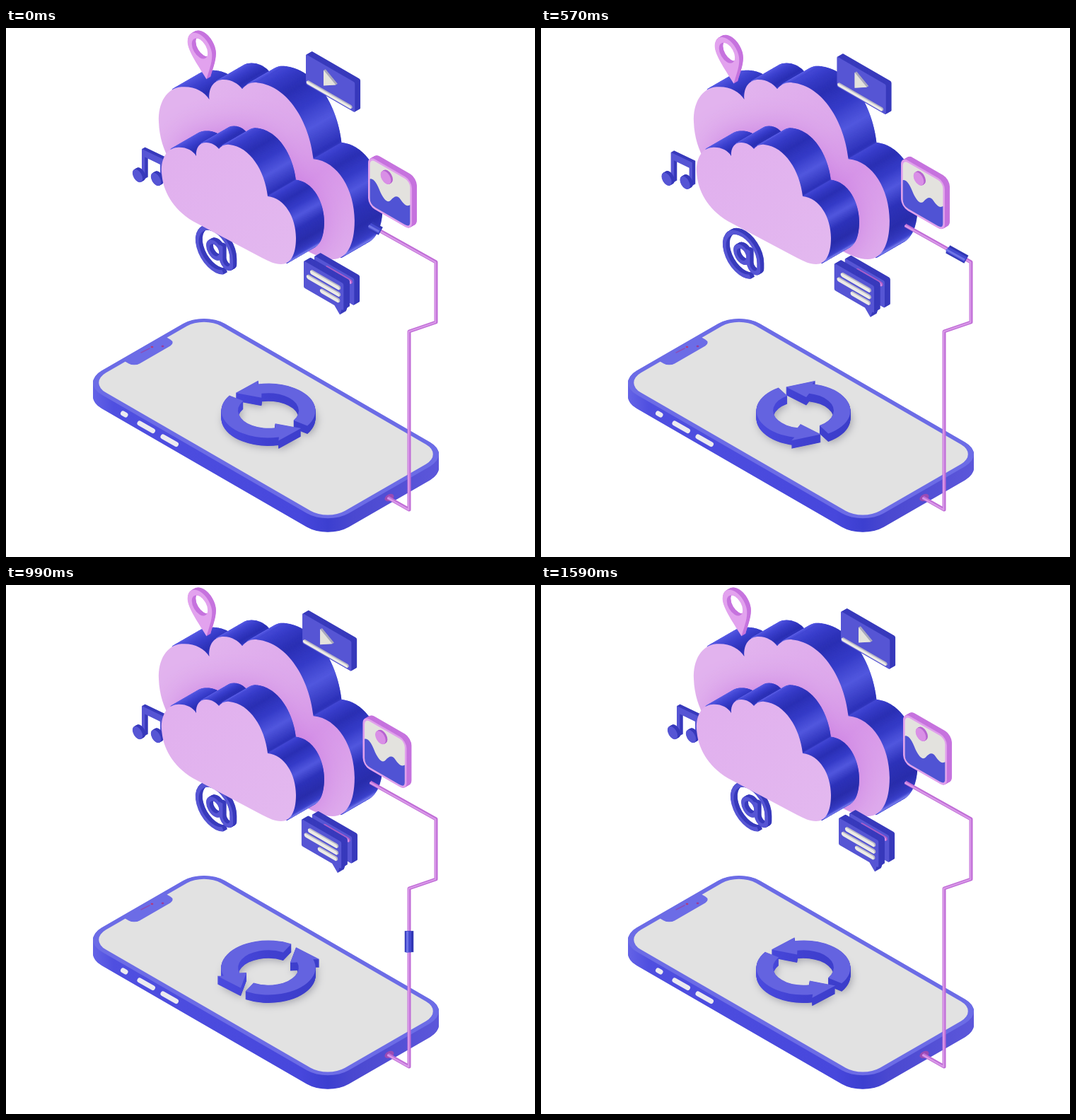
Recreate the animation shown at these times as an HTML page with a canvas. Size 748 by 748 pixels, loop 1.62 s.

```html
<!DOCTYPE html>
<html lang="en">
<head>
<meta charset="utf-8">
<title>Cloud sync</title>
<style>
html, body { margin: 0; height: 100%; overflow: hidden; background: #fff; }
canvas { display: block; width: 100vw; height: 100vh; }
</style>
</head>
<body>
<canvas id="stage" width="748" height="748"></canvas>
<script>
const SIZE = 748, LOOP = 1620, STEP = 30;
const CX = 0.866, SY = 0.5;
const stage = document.getElementById('stage').getContext('2d');
const sheet = document.createElement('canvas');
sheet.width = sheet.height = SIZE;
let ctx = stage;

const rect = (x, y, w, h, r) => { const p = new Path2D(); p.roundRect(x, y, w, h, r); return p; };
const circle = (x, y, r) => { const p = new Path2D(); p.arc(x, y, r, 0, 7); return p; };
const flat = () => ctx.setTransform(1, 0, 0, 1, 0, 0);

function ramp(x0, y0, x1, y1, ...stops) {
  const g = ctx.createLinearGradient(x0, y0, x1, y1);
  stops.forEach(([at, color]) => g.addColorStop(at, color));
  return g;
}

// Smooth curve through [time, value] rows
function track(rows, t) {
  const sec = i => (rows[i + 1][1] - rows[i][1]) / (rows[i + 1][0] - rows[i][0]);
  const slope = i => {
    if (i === 0 || i === rows.length - 1) return 0;
    const a = sec(i - 1), b = sec(i);
    return a * b > 0 ? 2 * a * b / (a + b) : 0;
  };
  const last = rows.length - 1;
  if (t >= rows[last][0]) return rows[last][1];
  const i = rows.findIndex((r, n) => n < last && t < rows[n + 1][0]);
  const h = rows[i + 1][0] - rows[i][0], u = (t - rows[i][0]) / h, v = 1 - u;
  return rows[i][1] * v * v * (1 + 2 * u) + rows[i + 1][1] * u * u * (3 - 2 * u)
    + h * u * v * (slope(i) * v - slope(i + 1) * u);
}

// Extrudes a path that lies in the upright plane
function wall(path, x, y, depth, face, side, width) {
  for (let k = depth; k >= 0; k -= 0.5) {
    ctx.setTransform(CX, SY, 0, 1, x + CX * k, y - SY * k);
    const color = k > 0 ? side : face;
    if (width) {
      ctx.lineWidth = width;
      ctx.strokeStyle = color;
      ctx.stroke(path);
    } else {
      ctx.fillStyle = color;
      ctx.fill(path, 'evenodd');
    }
  }
  flat();
}

function bar(x, y, x0, x1, ly, w, face = '#ecebe6', side = '#b9b8c6') {
  ctx.lineCap = 'round';
  wall(new Path2D(`M${x0} ${ly}H${x1}`), x - 1, y + 0.5, 2, face, side, w);
  ctx.lineCap = 'butt';
}

/* Clouds */
const CLOUD = 'M220 203C219 184 228 170 242 169C254 168 264 173 269 181C268 169 274 162 283 162' +
  'C291 162 297 166 301 171C305 166 311 164 316 165C345 168 366 202 370 238' +
  'C394 240 410 268 410 297C410 321 402 334 389 334C380 334 372 330 362 325L264 273C236 256 221 230 220 203Z';

// Side colour by direction of the surface, in degrees above the right
const SHADE = [
  [-60, 70, 76, 212], [-42, 125, 130, 238], [-28, 62, 68, 206], [-5, 42, 46, 172], [8, 46, 51, 186],
  [20, 82, 88, 222], [32, 54, 60, 200], [48, 43, 48, 180], [72, 58, 63, 204], [100, 82, 86, 224], [121, 104, 106, 234]
];
function shade(deg) {
  let i = 0;
  while (i < SHADE.length - 2 && deg > SHADE[i + 1][0]) i++;
  const a = SHADE[i], b = SHADE[i + 1];
  const u = Math.max(0, Math.min(1, (deg - a[0]) / (b[0] - a[0])));
  return `rgb(${[1, 2, 3].map(n => Math.round(a[n] + (b[n] - a[n]) * u))})`;
}

function cloud(kx, ky, dx, dy, fill) {
  const line = document.createElementNS('http://www.w3.org/2000/svg', 'path');
  line.setAttribute('d', CLOUD);
  const len = line.getTotalLength(), n = Math.round(len / 1.5), pts = [];
  for (let i = 0; i <= n; i++) {
    const p = line.getPointAtLength(len * i / n);
    pts.push([p.x * kx + dx, p.y * ky + dy]);
  }
  const edges = [];
  for (let i = 0; i < n; i++) {
    const [a, b] = [pts[i], pts[i + 1]];
    const nx = b[1] - a[1], ny = a[0] - b[0];
    if (nx * CX - ny * SY > 0) edges.push([a, b, shade(Math.atan2(-ny, nx) * 180 / Math.PI)]);
  }
  ctx.lineWidth = 1.8;
  ctx.lineCap = 'round';
  for (let k = 45; k >= 0; k -= 0.9) {
    for (const [a, b, color] of edges) {
      ctx.strokeStyle = color;
      ctx.beginPath();
      ctx.moveTo(a[0] + CX * k, a[1] - SY * k);
      ctx.lineTo(b[0] + CX * k, b[1] - SY * k);
      ctx.stroke();
    }
  }
  ctx.lineCap = 'butt';
  const face = new Path2D();
  face.addPath(new Path2D(CLOUD), new DOMMatrix([kx, 0, 0, ky, dx, dy]));
  ctx.fillStyle = fill;
  ctx.fill(face);
  return face;
}

function clouds() {
  const back = cloud(1.457, 1.477, -104.5, -166.3, ramp(290, 80, 480, 310,
    [0, '#e2b3ee'], [0.4, '#dda8eb'], [0.65, '#d796e8'], [1, '#deaaec']));
  ctx.save();
  ctx.clip(back);
  ctx.translate(28, -16);
  ctx.shadowColor = 'rgba(178,78,214,.6)';
  ctx.shadowBlur = 50;
  ctx.fill(new Path2D(CLOUD));
  ctx.restore();
  cloud(1, 1, 0, 0, ramp(240, 170, 400, 330, [0, '#e1b0ee'], [1, '#e3b8ef']));
}

/* Phone */
function onTop(path) {
  const p = new Path2D();
  p.addPath(path, new DOMMatrix([CX, SY, -CX, SY, 280, 401]));
  return p;
}

function phone() {
  const L = 403.3, W = 201.2;
  const body = onTop(rect(0, 0, L, W, 34));
  ctx.fillStyle = ramp(123, 0, 612, 0, [0, '#6463e6'], [0.06, '#4f4fe0'], [0.6, '#4747dc'],
    [0.68, '#3c3fd0'], [0.75, '#4a48d0'], [1, '#5c57da']);
  for (let k = 19.5; k > 0; k -= 0.5) {
    ctx.setTransform(1, 0, 0, 1, 0, k);
    ctx.fill(body);
  }
  flat();
  ctx.fillStyle = '#6c6ce6';
  ctx.fill(body);
  ctx.fillStyle = '#e2e2e2';
  ctx.fill(onTop(rect(6.5, 6.5, L - 13, W - 13, 28)));
  ctx.fillStyle = '#6c6ce6';
  ctx.fill(onTop(rect(5, 67, 16, 68, [0, 9, 9, 0])));
  ctx.lineCap = 'round';
  const dash = (x0, y0, x1, y1, w, color) => {
    ctx.lineWidth = w;
    ctx.strokeStyle = color;
    ctx.beginPath();
    ctx.moveTo(x0, y0);
    ctx.lineTo(x1, y1);
    ctx.stroke();
  };
  dash(191, 459, 203, 453, 1.6, '#8a4fb8');
  dash(206, 451, 207, 451, 2.6, '#b03c80');
  dash(221, 450, 222, 450, 2.6, '#9a3c98');
  dash(165.5, 545, 169, 547, 7, '#ecebf0');
  dash(189, 559, 207.5, 569.5, 7, '#ecebf0');
  dash(222, 578, 240.5, 588.5, 7, '#ecebf0');
  ctx.lineCap = 'butt';
  ctx.fillStyle = '#9a4bb4';
  ctx.beginPath();
  ctx.ellipse(542, 664, 7, 4.5, -0.5, 0, 7);
  ctx.fill();
}

/* Cable and the plug that runs along it */
const CABLE = [[515, 279], [608, 331], [608, 416], [570, 429], [570, 681], [540, 664]];
const PLUG = [[0, 2], [240, 3], [570, 84], [840, 221], [1140, 390], [1380, 497], [1500, 540]];

function piece(from, to) {
  const p = new Path2D();
  let s = 0, open = false;
  for (let i = 0; i < CABLE.length - 1; i++) {
    const [a, b] = [CABLE[i], CABLE[i + 1]];
    const len = Math.hypot(b[0] - a[0], b[1] - a[1]);
    const u = Math.max(0, (from - s) / len), v = Math.min(1, (to - s) / len);
    if (u < v) {
      const at = q => [a[0] + (b[0] - a[0]) * q, a[1] + (b[1] - a[1]) * q];
      if (!open) p.moveTo(...at(u));
      p.lineTo(...at(v));
      open = true;
    }
    s += len;
  }
  return p;
}

function pipe(path, layers) {
  ctx.lineJoin = 'round';
  for (const [w, color, shift] of layers) {
    ctx.setTransform(1, 0, 0, 1, shift, -shift / 4);
    ctx.lineWidth = w;
    ctx.strokeStyle = color;
    ctx.stroke(path);
  }
  flat();
  ctx.lineJoin = 'miter';
}

function cable(t) {
  pipe(piece(0, 999), [[5, '#bf6bd6', 0], [2.2, '#d999e8', -0.7]]);
  const s = track(PLUG, t);
  pipe(piece(s - 15, s + 15), [[12.5, '#3036b4', 0], [8, '#444ad0', -1], [3, '#6f74e6', -2.4]]);
}

/* Sync arrows */
const SPIN = [[0, 0], [240, 63], [570, 156], [840, 242], [1140, 303], [1380, 345], [1590, 358.5], [1620, 360]];

function arrow(path, base) {
  const rad = d => -d * Math.PI / 180;
  const to = (r, d) => path.lineTo(r * Math.cos(rad(d)), r * Math.sin(rad(d)));
  const tail = base - 137;
  path.moveTo(Math.cos(rad(tail)), Math.sin(rad(tail)));
  path.arc(0, 0, 1, rad(tail), rad(base), true);
  to(1.13, base - 2);
  to(0.95, base + 34);
  to(0.5, base + 4);
  path.arc(0, 0, 0.645, rad(base), rad(tail), false);
  path.closePath();
}

function spinner(t) {
  const turn = 103 + track(SPIN, t), p = new Path2D(), depth = 11.5;
  arrow(p, turn);
  arrow(p, turn + 180);
  const side = ramp(-1, 0, 1, 0, [0, '#4a4ade'], [0.5, '#4040d0'], [1, '#3b3dca']);
  for (let k = depth; k >= 0; k -= 0.5) {
    ctx.setTransform(66.5, 0, 0, 38.4, 371, 541 + k);
    ctx.shadowColor = k === depth ? 'rgba(80,80,100,.45)' : 'transparent';
    ctx.shadowBlur = 12;
    ctx.shadowOffsetX = 2;
    ctx.shadowOffsetY = 2;
    ctx.fillStyle = k > 0 ? side : '#6463e0';
    ctx.fill(p);
  }
  flat();
}

/* Floating icons */
const BLUE = '#5655d4', NAVY = '#383abc', PINK = '#e2a2ee', PLUM = '#c673de';

const pinShape = new Path2D('M-20 0A20 20 0 0 1 20 0C20 12 14 26 11 38C0 27 -20 14 -20 0Z');
pinShape.addPath(circle(0, 0, 13));
const atShape = new Path2D('M11 -12V7A8.5 8.5 0 0 0 28 7V0A28 28 0 1 0 14 24.3');
atShape.addPath(circle(0, 0, 10.5));
const notes = new Path2D('M0 0L35 -3V30H30V7L5 9V40H0Z');
const bubble = new Path2D('M2 0H63Q65 0 65 2V36Q65 38 63 38H62L59 47L50 38H2Q0 38 0 36V2Q0 0 2 0Z');
const hills = new Path2D('M3 32C9 27 15 33 20 42C26 50 32 52 37 45C43 36 48 32 53 36C59 40 62 42 68.5 36V60Q68.5 68 60 68H12Q3 68 3 59Z');
const play = new Path2D('M30 7L50 18L30 29Z');

function pin(x, y) { wall(pinShape, x + 274, y + 29, 6.5, PINK, PLUM); }

function at(x, y) { wall(atShape, x + 294.5, y + 314, 6, BLUE, NAVY, 5.5); }

function music(x, y) {
  x += 192;
  y += 171;
  wall(notes, x, y, 5, BLUE, NAVY);
  for (const [hx, hy] of [[-7, 41.5], [23, 31.5]]) wall(circle(hx, hy, 8.2), x, y, 5, BLUE, NAVY);
}

function video(x, y) {
  x += 424;
  y += 37;
  wall(rect(0, 0, 80, 42.5, 2), x, y, 9, BLUE, NAVY);
  wall(play, x - 1, y + 0.5, 3, '#e4e3dc', '#a9a8bd');
  bar(x, y, 4, 73, 38, 4);
}

function picture(x, y) {
  x += 512;
  y += 180;
  wall(rect(0, 0, 71.6, 71, 11), x, y, 8, '#e09fec', PLUM);
  wall(rect(3, 3, 65.6, 65, 8), x, y, 0, '#e3e2de');
  wall(hills, x, y, 0, '#5053d4');
  wall(circle(30, 16, 8.5), x - 1, y + 0.5, 3, '#d98fe6', '#b765d0');
}

function chat(x, y) {
  wall(rect(0, 0, 65, 38, 2), x + 436, y + 322, 9, BLUE, NAVY);
  bar(x + 436, y + 322, 21, 59, 7, 5, '#d98ee8', '#a95ac8');
  wall(bubble, x + 421, y + 329, 10, BLUE, NAVY);
  bar(x + 421, y + 329, 14, 57, 9.5, 5);
  bar(x + 421, y + 329, 8, 57, 19, 5);
  bar(x + 421, y + 329, 30, 56, 28, 5);
}

// One drift down-left and back: start, duration, distance
function drift(draw, t, start, span, reach) {
  const u = (t - start) / span;
  const d = u > 0 && u < 1 ? reach * Math.sin(Math.PI * u) ** 2 : 0;
  draw(-d, d * 0.57);
}

function paintSheet() {
  ctx = sheet.getContext('2d');
  clouds();
  phone();
  ctx = stage;
}

function frame() {
  const t = Math.floor(performance.now() % LOOP / STEP) * STEP;
  flat();
  ctx.fillStyle = '#fff';
  ctx.fillRect(0, 0, SIZE, SIZE);
  drift(music, t, 160, 765, 8.5);
  drift(at, t, 195, 730, 11);
  ctx.drawImage(sheet, 0, 0);
  cable(t);
  drift(pin, t, 195, 750, 11);
  drift(video, t, 310, 920, 9.2);
  drift(picture, t, 428, 814, 11);
  drift(chat, t, 210, 1000, 7.7);
  spinner(t);
  requestAnimationFrame(frame);
}

paintSheet();
frame();
</script>
</body>
</html>
```
